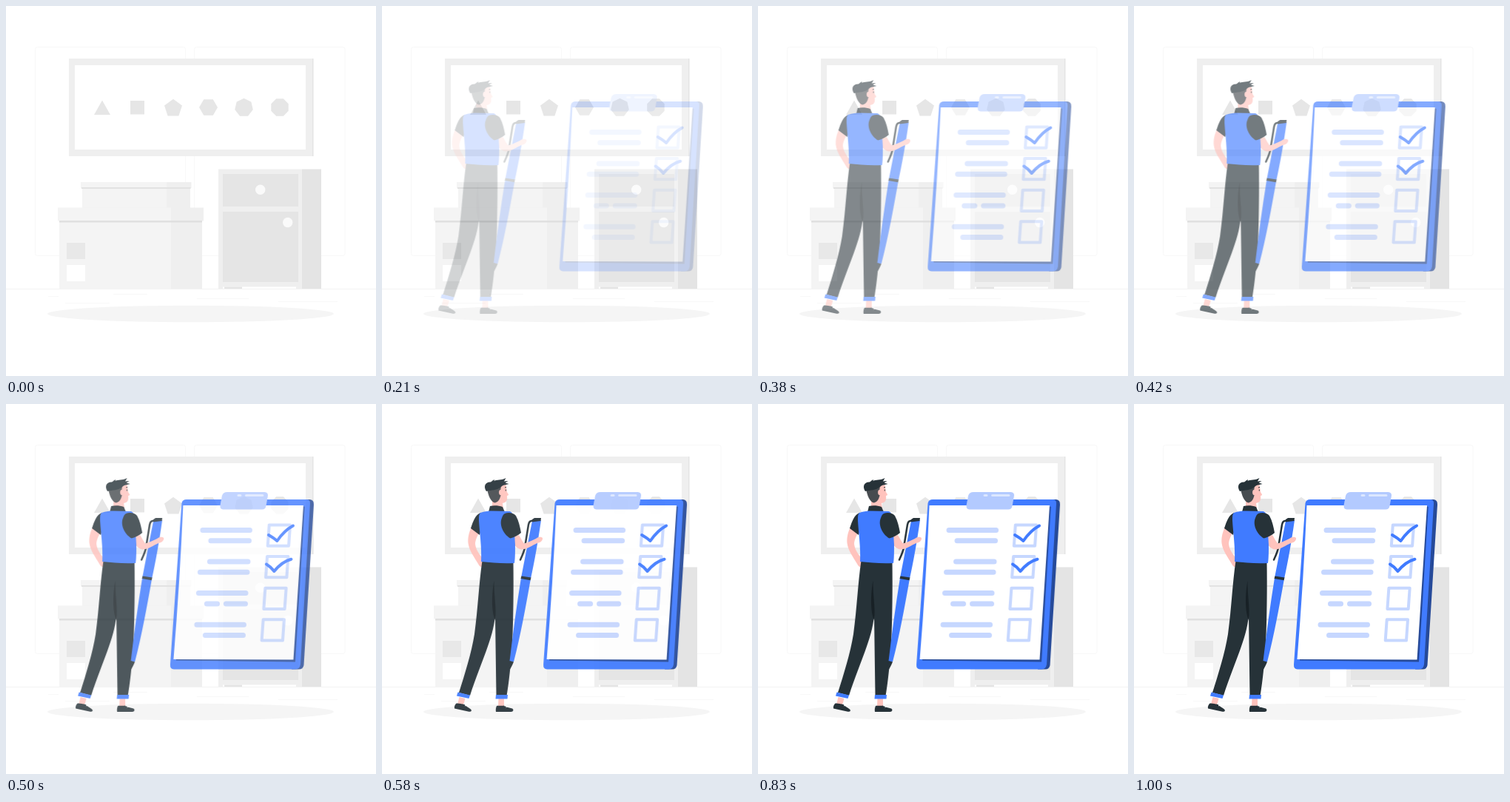
An HTML page that plays this animation: 500x500 px, repeating every 1.04 s.

```html
<!DOCTYPE html>
<html lang="en">
<head>
<meta charset="utf-8">
<title>Checklist</title>
<style>
  html, body { margin: 0; width: 100%; height: 100%; overflow: hidden; background: #fff; }
  svg { display: block; width: 100vw; height: 100vh; }
  #man, #board { opacity: 0; }
  .dark { fill: #263238; }
  .blue { fill: #407bff; }
  .skin { fill: #ffc3bd; }
  .navy { fill: #264a99; }
  .pale { stroke: #c6d7ff; stroke-linecap: round; stroke-linejoin: round; fill: none; }
  .tick { stroke: #407bff; stroke-width: 4; stroke-linecap: round; stroke-linejoin: round; fill: none; }
</style>
</head>
<body>
<svg viewBox="0 0 500 500">
  <!-- room -->
  <g fill="none" stroke="#f8f8f8">
    <rect x="39.5" y="55.5" width="203" height="282" rx="3"/>
    <rect x="254.500" y="55.500" width="203.500" height="282" rx="3"/>
    <path stroke="#f3f3f3" d="M0 382.500H500"/>
    <path d="M145 389.500H191M258 395.500H328M368 399.500H448M57 392.500H71M80 401.500H140"/>
  </g>

  <!-- picture frame -->
  <path fill="#e4e4e4" d="M405 71H415.500V203H405z"/>
  <path fill="#efefef" d="M85 71H414V203H85z"/>
  <path fill="#fff" d="M93 80H405V194H93z"/>
  <g id="shapes" fill="#e6e6e6">
    <path d="M130 127.500L141 147H119z"/>
    <path d="M168 128H187V146.500H168z"/>
  </g>

  <!-- boxes -->
  <path fill="#f4f4f4" d="M103 246H217V273H103zM101 238H217V246H101z"/>
  <path fill="#efefef" d="M217 246H249V273H217zM217 238H250.500V246H217z"/>
  <path fill="#e2e2e2" d="M102 245H249.500V247H102z"/>
  <path fill="#f4f4f4" d="M72 290H223V382H72zM70 272.500H223V290.500H70z"/>
  <path fill="#efefef" d="M223 290H265V382H223zM223 272.500H267V290.500H223z"/>
  <path fill="#e0e0e0" d="M72 290H265V292.500H72z"/>
  <path fill="#e8e8e8" d="M82 320H107V342H82z"/>
  <path fill="#fff" d="M82 350H107V372H82z"/>

  <!-- cabinet -->
  <path fill="#efefef" d="M287 220.500H400V382H287z"/>
  <path fill="#e4e4e4" d="M400 220.500H426V382H400z"/>
  <path fill="#e5e5e5" d="M293 227H395V271H293zM293 278H395V373H293z"/>
  <path fill="#fff" d="M293 379.500H392V382H293z"/>
  <path fill="#e4e4e4" d="M295 379.500H319V382H295z"/>
  <g fill="#fafafa">
    <circle cx="343.700" cy="248.300" r="6.700"/>
    <circle cx="380.700" cy="292.500" r="6.700"/>
  </g>
  <ellipse cx="249.500" cy="416" rx="193.500" ry="11.300" fill="#f5f5f5"/>

  <g id="man">
    <!-- far arm -->
    <path class="skin" d="M123 166C119 175 118 181 118.500 188C120 199 127 207 132 216C134 220 136 221 138 220L138 208C132 202 128 194 128 188C129 181 132 177 134 172z"/>
    <!-- ankles and shoes -->
    <path class="skin" d="M106.500 396L114.500 398L112 407L104 406zM159.500 397H167V409H159z"/>
    <path class="dark" d="M102.500 404.500C106 404 109 405.500 113 405.500C115 408.500 119 410 122 412.500C124 414.500 122.500 416.200 119.500 415.800L100 411.500C99.500 409 100.500 406 102.500 404.500z"/>
    <path class="dark" d="M157 408C160 407 163 408.500 167 407.500C170 410 174 410.500 178 411.500C180.500 413 179.500 416 176.500 416H156C155.500 413 156 410 157 408z"/>
    <path fill="none" stroke="#fff" stroke-width=".9" d="M112 405.500L116 404.500M114 408L117 406.500M167 408L171 406M169.500 410L172.500 408"/>
    <!-- trousers -->
    <path class="dark" d="M137.500 212L179.500 213C180 250 179.500 290 178 325C176 352 174 374 170.500 394.500H156.500L155 286C152 318 136 348 121 394L106 390C114 365 123 336 127 311C132 274 133 242 137.500 212z"/>
    <path fill="#182126" d="M153.500 239C150 258 150 281 155 292C157 275 153 258 153.500 239z"/>
    <path class="blue" d="M104.500 389.500L121 393.500L119.500 398L103 394.500zM156 393H172L171.500 398.500H155.500z"/>
    <!-- pen -->
    <path class="blue" d="M205 158L217 157C213 185 208 214 203 236C196 276 189 314 180 348.500L174.500 347.500C179 310 184 272 190 235C195 209 200 183 205 158z"/>
    <path class="dark" d="M205 156L208 154L217 154L216.500 158L205 159.500zM190.500 232.500L203.500 234.500L202.500 238.200L189.500 236zM174.500 347L180 348.500C178 353 176 358 173 361z"/>
    <path fill="none" stroke="#263238" stroke-width="2.500" stroke-linecap="round" d="M207 157.500C202 157.500 201 159 200 163L195 194C194 200 191 206 189 210.500"/>
    <!-- near arm -->
    <path class="skin" d="M175 181L187 177C190 182 192 186 194 188.500C200 187 205 184 210 182C213 179.500 217 179 219 181C219.500 184 217 187 212 188C205 191 198 196 192 196.500C184 197 179 188 175 181z"/>
    <!-- head -->
    <path class="skin" d="M151 128L161 111L169.500 109C170.500 113 170.500 117 171 119L173 122.300C173 123.500 172 124 171 124C171.500 128 171 131 169 132.500C167.500 133.500 166 133.500 165 134L166 141H151z"/>
    <path fill="#474c50" d="M144 114L163 111C162 116 162.500 118 163 121C162 128 159 133 154.500 133.500C149 132 145.500 124 144 114z"/>
    <path class="dark" d="M143 118C139 112 141 105 149 105.500C151 104 152 103 154 102L153.500 104C158 101.500 162 104 169.500 100L167 104.500L172.500 104L168.500 106.500L173.500 108C169 109.500 166 109 163 112C158 117 149 116 143 118z"/>
    <ellipse class="skin" cx="162.700" cy="119.500" rx="2.600" ry="3.700"/>
    <path fill="none" stroke="#263238" d="M168 113L170 112.500M169.300 115.500V117.500"/>
    <!-- shirt and vest -->
    <path class="dark" d="M148 138C153 136.500 160 137 165 139L168 146H146zM135 147C128 150 125 159 122 168L134 177L139 158z"/>
    <path class="blue" d="M135 147C140 145 147 144.500 152 144.500L175 145C182 149 182 160 181 174L182 190C182 200 182 209 181 215C166 216 150 214.500 136 213C137 194 134 174 133 158C133 152 133 149 135 147z"/>
    <path class="dark" d="M168 148C173 146 180 147 183 151C187 158 188.500 166 190 174C186 177.500 181 180 175.500 181.500C166 176 160 163 164 154C165 151 166 149 168 148z"/>
  </g>

  <g id="board">
    <path class="navy" d="M400 129H405Q410.500 130 410 136L396.500 353Q395.500 358.500 390 358.500H380z"/>
    <path class="blue" d="M238 129H401Q405.500 129.500 405 135L392 352Q391 358.500 385 358.500H221Q215.500 358 216 352L231.500 134Q232.500 129 238 129z"/>
    <path class="navy" d="M395.500 138L397.700 139L385 348.500L224 346.500V344.500H381z"/>
    <path fill="#fff" d="M233.500 137H396L382.500 345.500L220.500 345Q229 240 233.500 137z"/>
    <path fill="#b3caff" d="M293 119H343.500Q348.500 119.500 348 124L345.500 138Q344.500 142.500 340 142.500H287.500Q283 142 283.500 137L286 124Q287.500 119 293 119z"/>
    <path fill="none" stroke="#dce7ff" stroke-width="3" stroke-linecap="round" d="M308 123.500H311M318.500 123.500H341"/>
    <path id="rows" class="pale" stroke-width="7"/>
    <path id="cells" class="pale" stroke-width="4"/>
    <path class="tick" d="M349 177Q356 181 360.500 185Q370 171 382 164.500M346 216.500Q352 220 356.500 226Q367 213 379.500 209.700"/>
  </g>
</svg>
<script>
  const $ = id => document.getElementById(id);

  // Wall art: regular polygons with 5 to 8 sides.
  const polygon = (n, cx, cy, r, turn) => "M" + Array.from({ length: n }, (_, i) => {
    const a = turn + i * 2 * Math.PI / n;
    return (cx + r * Math.cos(a)).toFixed(2) + " " + (cy + r * Math.sin(a)).toFixed(2);
  }).join("L") + "z";
  const up = -Math.PI / 2;
  const art = document.createElementNS("http://www.w3.org/2000/svg", "path");
  art.setAttribute("d",
    polygon(5, 226, 138.300, 12.600, up) + polygon(6, 273.500, 137, 12.500, 0) +
    polygon(7, 321.500, 137.300, 12.600, up) + polygon(8, 370, 137, 12.700, Math.PI / 8));
  $("shapes").append(art);

  // Text bars: left, right, middle height.
  const bars = [
    [256.5, 327, 170.5], [267.5, 326, 184.7], [266, 324.5, 213], [253, 323.5, 227.3],
    [251, 321.5, 255.6], [262, 283, 269.9], [288, 321, 269.9], [248.5, 319, 298.2], [260, 318, 312.5]
  ];
  $("rows").setAttribute("d", bars.map(([l, r, y]) => `M${l + 3.5} ${y}H${r - 3.5}`).join(""));

  $("cells").setAttribute("d", [0, 1, 2, 3].map(i =>
    `M${349.8 - 2.7 * i} ${163.5 + 42.6 * i}h28.300l-2 28.200h-28.300z`).join(""));

  // Slide-in easing: cubic-bezier(.36, -.01, .5, 1.38).
  const bezier = (a, b, s) => 3 * a * s * (1 - s) ** 2 + 3 * b * s * s * (1 - s) + s ** 3;
  function ease(x) {
    if (x >= 1) return 1;
    let lo = 0, hi = 1;
    for (let i = 0; i < 30; i++) {
      const mid = (lo + hi) / 2;
      if (bezier(.36, .5, mid) < x) lo = mid; else hi = mid;
    }
    return bezier(-.01, 1.38, lo);
  }

  const LOOP = 1040, STEP = 1000 / 24, LEAD = 33, SHIFT = 30;

  function slide(el, from) {
    const frames = [{ offset: 0, opacity: 0, transform: `translateX(${from}px)`, easing: "step-end" }];
    for (let k = 3; k <= 24; k++) {
      const p = ease((k * STEP + LEAD) / 1000);
      frames.push({
        offset: Math.round(k * STEP / 10) * 10 / LOOP,
        opacity: Math.min(1, p),
        transform: `translateX(${from * (1 - p)}px)`,
        easing: "step-end"
      });
    }
    frames.push({ ...frames[frames.length - 1], offset: 1 });
    el.animate(frames, { duration: LOOP, iterations: Infinity });
  }
  slide($("man"), -SHIFT);
  slide($("board"), SHIFT);
</script>
</body>
</html>
```
